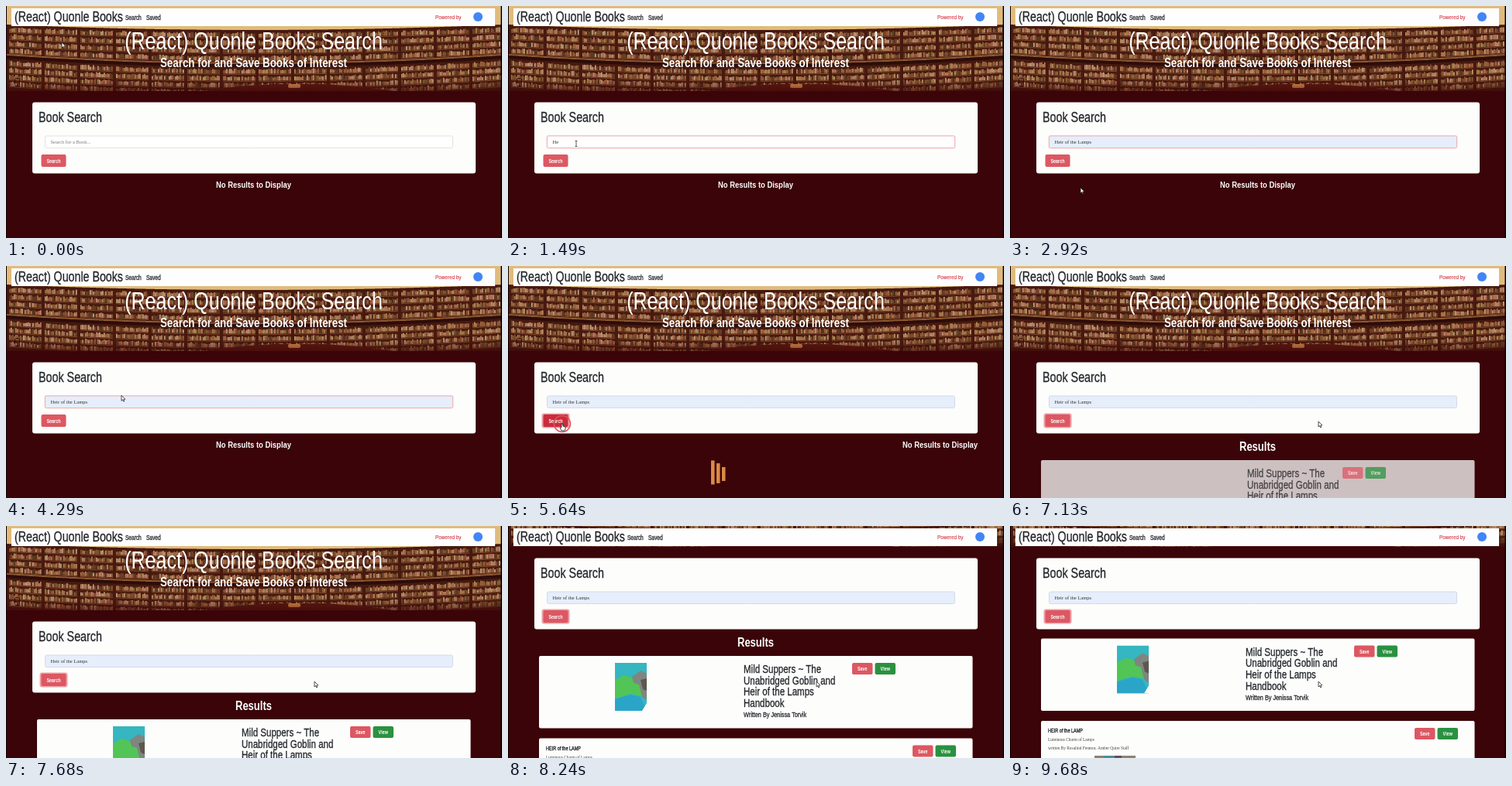
Recreate the animation shown at these times as an HTML page with a canvas. Size 640x300 px, loop 9810 ms.

```html
<!DOCTYPE html>
<html lang="en">
<head>
<meta charset="utf-8">
<title>Book search</title>
<style>
  html, body { margin: 0; width: 100%; height: 100%; overflow: hidden; background: #3b0408; }
  canvas { display: block; }
</style>
</head>
<body>
<canvas id="stage" width="640" height="300"></canvas>
<script>
const LOOP = 9810;
const NARROW = 0.8; // one condensed face for all headings
const SANS = '"Liberation Sans", Arial, sans-serif';
const SERIF = '"Liberation Serif", "Times New Roman", serif';
const INK = '#212429', PAPER = '#fdfdfc', WINE = '#3b0408', RED = '#dc5863', GREEN = '#2a9140';
const QUERY = 'Heir of the Lamps';
const CLICKS = [[700, 960], [5400, 5980]];
const CURSOR = [ // time, x, y
  [0, 72, 47], [100, 72, 47], [680, 88, 178], [2550, 88, 178], [2920, 91, 235],
  [3560, 98, 230], [3700, 98, 229], [4440, 155, 160], [5100, 155, 160],
  [5420, 70, 204], [6150, 70, 204], [6700, 398, 201], [LOOP, 398, 201]
];

const stage = document.getElementById('stage');
let ctx = stage.getContext('2d');

const ramp = (t, from, to) => Math.min(1, Math.max(0, (t - from) / (to - from)));
const ease = p => p * p * (3 - 2 * p);

function box(x, y, w, h, fill, radius = 0, stroke) {
  ctx.beginPath();
  ctx.roundRect(x, y, w, h, radius);
  if (fill) { ctx.fillStyle = fill; ctx.fill(); }
  if (stroke) { ctx.strokeStyle = stroke; ctx.lineWidth = 1; ctx.stroke(); }
}

function shape(fill, points) {
  ctx.beginPath();
  points.forEach(([x, y]) => ctx.lineTo(x, y));
  ctx.closePath();
  ctx.fillStyle = fill;
  ctx.fill();
}

function text(string, x, y, size, color = INK, { bold = false, align = 'left', heavy = 0.3 } = {}) {
  ctx.save();
  ctx.translate(x, y);
  ctx.scale(NARROW, 1);
  ctx.font = `${bold ? 'bold ' : ''}${size}px ${SANS}`;
  ctx.textAlign = align;
  ctx.fillStyle = ctx.strokeStyle = color;
  ctx.fillText(string, 0, 0);
  if (!bold && heavy) { ctx.lineWidth = heavy; ctx.strokeText(string, 0, 0); }
  ctx.restore();
}

function serif(string, x, y, size, color) {
  ctx.font = `${size}px ${SERIF}`;
  ctx.textAlign = 'left';
  ctx.fillStyle = color;
  ctx.fillText(string, x, y);
}

function button(label, x, y, w, h, color) {
  box(x, y, w, h, color, 2);
  text(label, x + w / 2, y + h / 2 + 2.6, 6.8, '#fff', { bold: true, align: 'center' });
}

// Curved library shelves, painted once
function paintLibrary() {
  const canvas = document.createElement('canvas');
  canvas.width = 640;
  canvas.height = 110;
  const screen = ctx;
  ctx = canvas.getContext('2d');
  let seed = 7;
  const random = () => (seed = seed * 16807 % 2147483647) / 2147483647;
  const sag = (x, depth) => depth * (1 - ((x - 320) / 320) ** 2);

  box(0, 0, 640, 110, '#e0bb7c');
  for (let x = 0; x < 640; x += 2) {
    box(x, 24 + sag(x, 7), 2, 90, '#48190f');
    box(x, 62 + sag(x, 11), 2, 2, '#8e5a32');
    box(x, 64 + sag(x, 11), 2, 4, '#2c0d0a');
  }
  for (let row = 0; row < 8; row++) {
    const lower = row > 3;
    const base = lower ? 70 + (row - 4) * 9 : 27 + row * 9;
    for (let x = 0; x < 640; x += 2) {
      const y = base + sag(x, lower ? 11 : 7 + row);
      if (x % 46 < 3) continue;
      const height = 4 + random() * 2.5;
      box(x, y + 6.5 - height, 1.6, height, `hsl(${16 + random() * 22} 42% ${22 + random() * 46}%)`);
      box(x, y + 6.8, 2, 1, '#7c4526');
    }
  }
  shape('#5a1a10', [[255, 110], [300, 104], [345, 101], [410, 101], [455, 104], [500, 110]]);
  box(364, 101, 16, 5, '#d98b4a', 2);
  box(11.5, 93.5, 6, 10, null, 1, '#2a0f0a');
  const shade = ctx.createLinearGradient(0, 96, 0, 110);
  shade.addColorStop(0, 'rgba(59,4,8,0)');
  shade.addColorStop(1, 'rgba(59,4,8,.55)');
  box(0, 96, 640, 14, shade);
  ctx = screen;
  return canvas;
}
const library = paintLibrary();

function drawNav() {
  box(7, 3, 624, 23, '#fefefe');
  text('(React) Quonle Books', 11, 20, 17.8);
  text('Search', 154, 18, 8.2);
  text('Saved', 181, 18, 8.2);
  text('Powered by', 554, 17, 7.9, '#d0313c', { heavy: 0.1 });
  ctx.beginPath();
  ctx.arc(609, 14, 6, 0, 7);
  ctx.fillStyle = '#4285f4';
  ctx.fill();
}

function drawForm(t) {
  const focused = t >= 800 && t < 5400;
  const filled = t >= 1710;
  box(34, 124.5, 572, 92, PAPER, 3);
  text('Book Search', 42, 150, 17.9);

  if (focused) box(49.5, 167, 528, 17.5, '#f9dcdc', 3);
  box(50.5, 168, 526, 15.5, filled ? '#e6eefb' : '#fff', 2, focused ? '#eeb4b4' : filled ? '#d3dbe8' : '#e2e2e2');
  if (t < 1240) serif('Search for a Book...', 57.5, 178, 6.5, '#777');
  else serif(filled ? QUERY : QUERY.slice(0, t < 1480 ? 1 : 2), 57.5, 178, 6.5, filled && t < 2010 ? '#666' : '#333');

  if (t >= 5400) box(43.5, 190.5, 36, 19, '#eda0a5', 3);
  button('Search', 45.5, 192, 32, 16, t > 5350 && t < 6250 ? '#cb2c3c' : RED);
}

function drawSpinner(t) {
  for (let i = 0; i < 3; i++) {
    const pulse = (1 + Math.cos((t - 5640 - i * 200) / 1200 * 2 * Math.PI)) / 2;
    const height = 16 + 15 * pulse ** 1.5;
    box(262 + i * 7, 267 + i - height / 2, 4.5, height, '#dc8a48');
  }
}

function drawCover(x, y) {
  ctx.save();
  ctx.beginPath();
  ctx.rect(x, y, 41, 62);
  ctx.clip();
  box(x, y, 41, 62, '#35b6c0');
  ctx.translate(x, y);
  shape('#52c556', [[0, 22], [12, 16], [24, 20], [41, 30], [41, 44], [20, 40], [0, 46]]);
  shape('#2aa5c8', [[0, 47], [20, 41], [33, 44], [41, 62], [0, 62]]);
  shape('#7f8580', [[22, 18], [33, 10], [41, 14], [41, 48], [35, 44], [31, 28], [24, 26]]);
  shape('#5d5750', [[33, 22], [41, 20], [41, 36], [36, 34]]);
  shape(PAPER, [[41, 52], [41, 62], [35, 62]]);
  ctx.restore();
}

function drawCards(t, top) {
  const loaded = t >= 7260;
  const left = loaded ? 304 : 306, buttons = loaded ? 444 : 429;
  ctx.globalAlpha = ramp(t, 6300, 7400);
  box(40, top, 559.5, 93.5, PAPER, 2);
  if (loaded) drawCover(138, top + 9);
  ['Mild Suppers ~ The', 'Unabridged Goblin and', QUERY, 'Handbook']
    .forEach((line, i) => text(line, left, top + 22 + i * 14.7, 14.4));
  text('Written By Jenissa Torvik', left, top + 79, 9.1);
  button('Save', buttons, top + 9, 26.5, 15, RED);
  button('View', buttons + 29.5, top + 9, 26.5, 15, GREEN);

  const next = top + 106.5;
  box(40, next, 559.5, 93.5, PAPER, 2);
  text('HEIR of the LAMP', 49, next + 15, 6.9);
  serif('Luminous Charm of Lamps', 49, next + 26, 5.4, '#444');
  serif('written By Rosalind Fenmor, Amber Quire Staff', 49, next + 36.5, 5.4, '#444');
  box(109, next + 45, 53, 40, '#8d8170');
  box(121, next + 45, 14, 40, '#4f8d93');
  box(135, next + 45, 9, 40, '#6b4a5c');
  button('Save', 522, next + 9, 26.5, 15, RED);
  button('View', 551.5, next + 9, 26.5, 15, GREEN);
  ctx.globalAlpha = 1;
}

function drawCursor(t) {
  const i = CURSOR.findIndex(key => key[0] > t);
  const [t0, x0, y0] = CURSOR[i - 1], [t1, x1, y1] = CURSOR[i];
  const p = ease(ramp(t, t0, t1));
  const x = x0 + (x1 - x0) * p, y = y0 + (y1 - y0) * p;

  if (CLICKS.some(([from, to]) => t >= from && t < to)) {
    ctx.beginPath();
    ctx.arc(x, y, 10.5, 0, 7);
    ctx.strokeStyle = '#e0505c';
    ctx.lineWidth = 1.5;
    ctx.stroke();
  }
  ctx.save();
  ctx.translate(x, y);
  ctx.strokeStyle = '#222';
  ctx.lineWidth = 0.8;
  if (x > 50 && x < 577 && y > 168 && y < 183) {
    box(-0.4, -4, 0.8, 8, '#333');
    box(-1.5, -4, 3, 0.7, '#333');
    box(-1.5, 3.3, 3, 0.7, '#333');
  } else if (x > 45 && x < 78 && y > 192 && y < 209) {
    shape('#fff', [[-1, 0], [0.5, 0], [1, 3], [4, 4], [4, 7], [3, 9], [-1, 9], [-3, 5], [-1, 5]]);
    ctx.stroke();
  } else {
    shape('#fff', [[0, 0], [0, 7], [1.6, 5.6], [2.7, 8], [3.7, 7.5], [2.7, 5.2], [4.8, 5]]);
    ctx.stroke();
  }
  ctx.restore();
}

function draw(t) {
  const scroll = ramp(t, 7600, 7680) + 82 * ramp(t, 7880, 8240);
  const loading = t >= 5500;
  const white = { bold: true, align: 'center' };
  box(0, 0, 640, 300, WINE);
  ctx.save();
  ctx.translate(0, -scroll);
  ctx.drawImage(library, 0, 0);
  text('(React) Quonle Books Search', 319.5, 56, 31.3, '#fff', { align: 'center', heavy: 0 });
  text('Search for and Save Books of Interest', 319.5, 79, 16.7, '#fff', white);
  drawForm(t);
  if (t < 6210) {
    text('No Results to Display', loading ? 606 : 319.5, 235, 11.8, '#fff', { bold: true, align: loading ? 'right' : 'center' });
    if (loading) drawSpinner(t);
  } else {
    if (t < 9680) text('Results', 319.5, 239, 16.3, '#fff', white);
    drawCards(t, t < 9680 ? 251 : 228.5);
  }
  ctx.restore();
  drawNav();
  box(0, 0, 1, 300, '#100');
  box(638.5, 0, 1.5, 300, '#100');
  drawCursor(t);
}

const start = performance.now();
function tick() {
  draw((performance.now() - start) % LOOP);
  requestAnimationFrame(tick);
}
tick();
</script>
</body>
</html>
```
